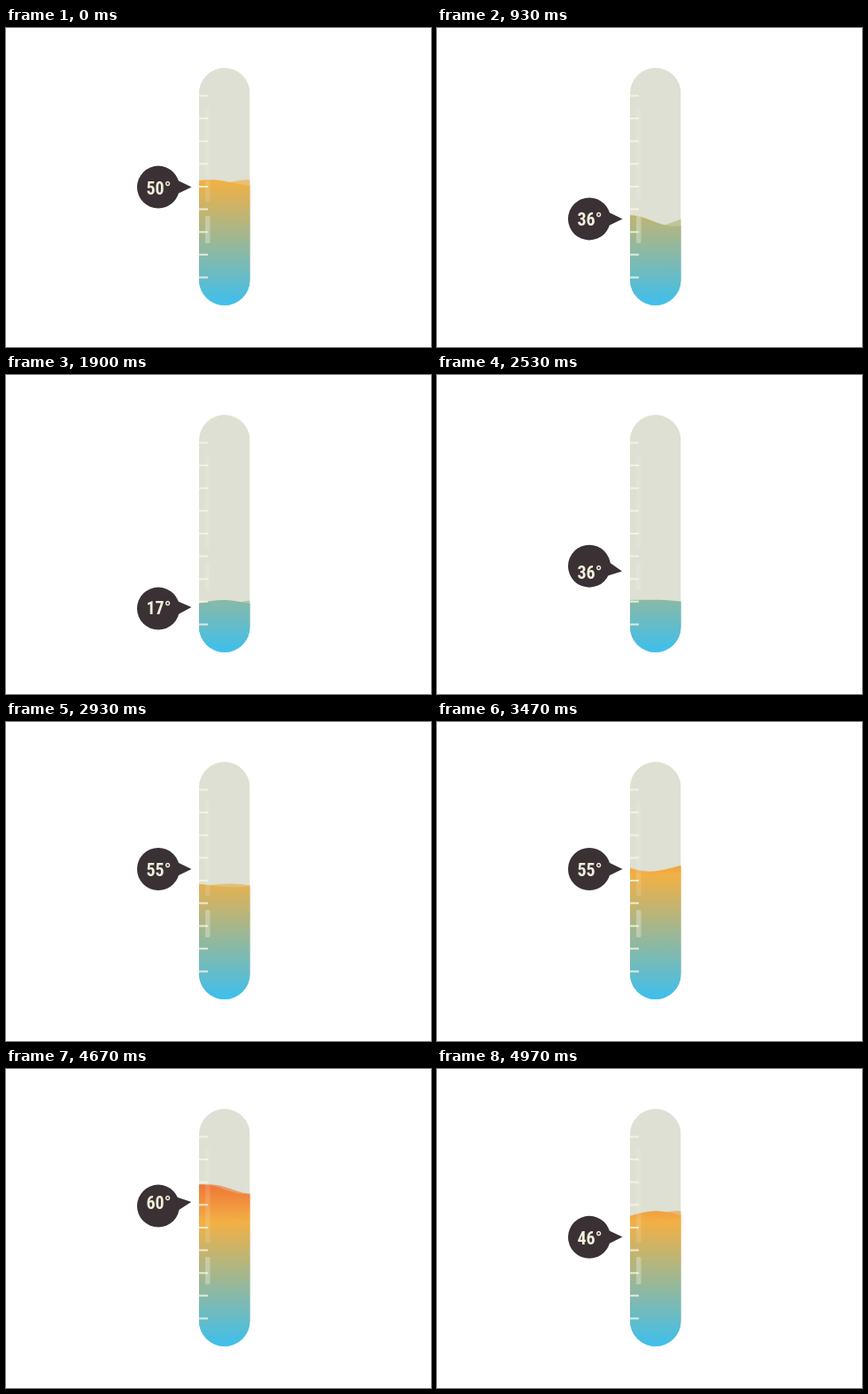
Animation of 480x360 px, one loop 5000 ms. Source, as an HTML page with a canvas:

```html
<!DOCTYPE html>
<html lang="en">
<head>
<meta charset="utf-8">
<title>Thermometer</title>
<style>
html, body { margin: 0; width: 100%; height: 100%; overflow: hidden; background: #fff; }
canvas { display: block; width: 480px; height: 360px; }
</style>
</head>
<body>
<canvas id="stage"></canvas>
<script>
const LOOP = 5;
const TAU = 2 * Math.PI;
const WAVELENGTH = 100;
const TUBE = { x: 218, y: 45, w: 57.5, h: 268, r: 28.75 };

const canvas = document.getElementById('stage');
const ctx = canvas.getContext('2d');
const ratio = window.devicePixelRatio || 1;
canvas.width = 480 * ratio;
canvas.height = 360 * ratio;

// Eased moves: from second, to second, reached temperature
const BUBBLE = { from: 50, moves: [[0, 0.9, 36], [1.15, 2.12, 14.4], [2.2, 2.84, 55.3], [3.5, 4.2, 78.8], [4.3, 4.97, 46]] };
const LIQUID = { from: 52, moves: [[0, 0.85, 35.2], [1.05, 2.2, 16.6], [2.38, 3.15, 55.8], [3.5, 4.23, 82.7], [4.3, 4.97, 55.9]] };

const heightOf = degrees => 179.6 + (50 - degrees) * 2.56;

function degreesAt({ from, moves }, t) {
  let degrees = from;
  for (const [start, end, goal] of moves) {
    const u = Math.min(1, Math.max(0, (t - start) / (end - start)));
    degrees += (goal - degrees) * u * u * (3 - 2 * u);
  }
  return degrees;
}

const heat = ctx.createLinearGradient(0, 100, 0, 310);
heat.addColorStop(0, '#ef4b2d');
heat.addColorStop(0.345, '#f2b044');
heat.addColorStop(1, '#41bfea');

function fillBar(x, y, w, h, r, color) {
  ctx.fillStyle = color;
  ctx.beginPath();
  ctx.roundRect(x, y, w, h, r);
  ctx.fill();
}

function fillWave(level, crest, swell, alpha) {
  const right = TUBE.x + TUBE.w, bottom = TUBE.y + TUBE.h;
  ctx.beginPath();
  ctx.moveTo(TUBE.x, bottom);
  for (let x = TUBE.x; x <= right + 1; x++) {
    ctx.lineTo(x, level - swell * Math.cos(TAU * (x - crest) / WAVELENGTH));
  }
  ctx.lineTo(right + 1, bottom);
  ctx.globalAlpha = alpha;
  ctx.fillStyle = heat;
  ctx.fill();
  ctx.globalAlpha = 1;
}

function drawTube(t) {
  const level = heightOf(degreesAt(LIQUID, t));
  const swell = 3.8 + 2.4 * Math.cos(TAU * (t - 0.93) / 3.3);
  const surge = 30 * Math.sin(TAU * t / LOOP);

  ctx.save();
  ctx.beginPath();
  ctx.roundRect(TUBE.x, TUBE.y, TUBE.w, TUBE.h, TUBE.r);
  ctx.clip();
  ctx.fillStyle = '#dde0d2';
  ctx.fillRect(TUBE.x, TUBE.y, TUBE.w, TUBE.h);
  fillWave(level, 275 + 100 * t + surge, swell, 0.68);
  fillWave(level, 230 + 124 * t - surge, swell, 1);

  fillBar(225, 90, 5.5, 106, 1.5, 'rgba(240,240,230,.16)');
  fillBar(225, 212, 5.5, 31, 1.5, 'rgba(230,234,222,.4)');
  for (let i = 0; i < 9; i++) fillBar(TUBE.x, 75.4 + i * 25.63, 10, 2, 0, 'rgba(250,246,228,.82)');
  ctx.restore();
}

function drawBubble(t) {
  const degrees = degreesAt(BUBBLE, t);
  const y = heightOf(degrees);
  const lag = heightOf(degreesAt(BUBBLE, t - 0.024)) - y;

  ctx.save();
  ctx.translate(172, y);
  ctx.fillStyle = '#3a3134';
  ctx.beginPath();
  ctx.arc(0, 0, 24, 0, TAU);
  ctx.fill();

  ctx.save();
  ctx.rotate(Math.atan2(lag, 37));
  ctx.beginPath();
  ctx.moveTo(21, -8);
  ctx.lineTo(37.5, 0);
  ctx.lineTo(21, 8);
  ctx.fill();
  ctx.restore();

  ctx.font = 'bold condensed 20px "Roboto Condensed", "Liberation Sans Narrow", Roboto, sans-serif';
  ctx.fillStyle = '#f4efdc';
  ctx.textAlign = 'center';
  ctx.fillText(Math.round(degrees) + '°', 0.5, 8 + lag);
  ctx.restore();
}

function draw(t) {
  ctx.setTransform(ratio, 0, 0, ratio, 0, 0);
  ctx.fillStyle = '#fff';
  ctx.fillRect(0, 0, 480, 360);
  drawTube(t);
  drawBubble(t);
}

const start = performance.now();
function tick() {
  draw((performance.now() - start) / 1000 % LOOP);
  requestAnimationFrame(tick);
}
tick();
</script>
</body>
</html>
```
